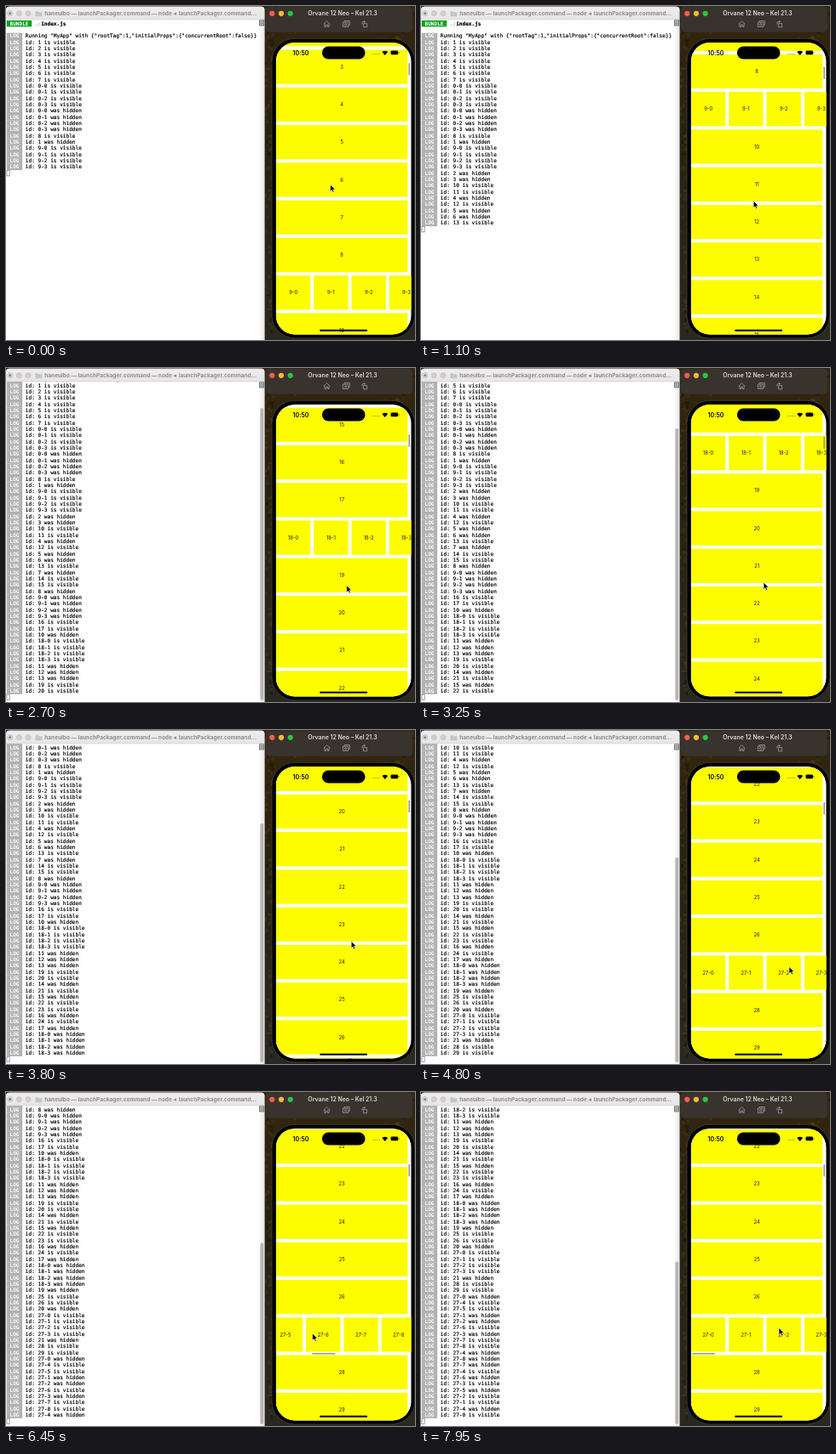
Write an HTML page that moves like this. It is 480x393 px and loops after 8000 ms.

```html
<!DOCTYPE html>
<html lang="en">
<head>
<meta charset="utf-8">
<title>Visibility log</title>
<style>
  html, body { margin: 0; width: 100%; height: 100%; overflow: hidden; background: #1b1712; }
  svg { display: block; width: 100vw; height: 100vh; }
  .ui { font-family: Inter, Roboto, sans-serif; }
  .mono { font: 6.1px "DejaVu Sans Mono", "Liberation Mono", monospace; fill: #000; }
  .mono text { stroke: #000; stroke-width: .16px; }
  .bold { font-weight: 700; }
  .mono .tag { font-weight: 700; fill: #fff; stroke: none; }
  .mono .dim { fill: #999; stroke: none; }
  .cell { font-size: 5.8px; text-anchor: middle; fill: #1c1c00; }
</style>
</head>
<body>
<svg viewBox="0 0 480 393" xmlns="http://www.w3.org/2000/svg">
  <defs>
    <clipPath id="screen"><rect x="316.9" y="43" width="158.6" height="343.4" rx="22"/></clipPath>
    <clipPath id="page"><rect y="16" width="297" height="377"/></clipPath>
    <linearGradient id="bar" x2="0" y2="1">
      <stop offset="0" stop-color="#efedee"/><stop offset="1" stop-color="#e6e4e5"/>
    </linearGradient>
    <linearGradient id="track">
      <stop offset="0" stop-color="#fdfdfd"/><stop offset="1" stop-color="#e9e9e9"/>
    </linearGradient>
    <linearGradient id="wall" x2="0" y2="1">
      <stop offset="0" stop-color="#35260f"/><stop offset=".4" stop-color="#28220f"/><stop offset="1" stop-color="#2a2820"/>
    </linearGradient>
  </defs>

  <rect width="480" height="393" fill="url(#wall)"/>
  <g id="specks"></g>

  <g id="terminal">
    <path d="M0 393V4.8a4 4 0 0 1 4-4H299.4a4 4 0 0 1 4 4V393z" fill="#fefefe"/>
    <g clip-path="url(#page)"><g id="log" class="mono"></g></g>
    <rect x="297" y="16" width="6.4" height="377" fill="url(#track)"/>
    <rect id="thumb" x="298.4" width="3.8" rx="1.9" fill="#b6b6b6"/>
    <rect x="297.6" y="16.6" width="4.8" height="6.4" fill="#c4c4c4" stroke="#5c5c5c" stroke-width=".8"/>
    <path d="M298.5 18.7h3M298.5 20.9h3" stroke="#5c5c5c" stroke-width=".8"/>
    <path d="M0 16V4.8a4 4 0 0 1 4-4H299.4a4 4 0 0 1 4 4V16z" fill="url(#bar)"/>
    <path d="M0 16h303.4" stroke="#d0cecf" stroke-width=".6"/>
    <g fill="#d0cecf" stroke="#bdbbbc" stroke-width=".5">
      <circle cx="4.7" cy="8.7" r="3.1"/><circle cx="15.3" cy="8.7" r="3.1"/><circle cx="26" cy="8.7" r="3.1"/>
    </g>
    <circle cx="4.7" cy="8.7" r="1.1" fill="#666"/>
    <path d="M34.5 6.2h3l.8 1h4v5h-7.8z" fill="#c3c5c7"/>
    <text class="ui" x="45.3" y="11" font-size="6.5" font-weight="700" fill="#8d8b8c">haneulbo — launchPackager.command — node ◂&#160; launchPackager.command…</text>
    <path d="M303.4 5V393" stroke="#8b8883" stroke-width=".5"/>
  </g>

  <g id="toolbar">
    <rect x="305" y=".8" width="172" height="30" rx="4.5" fill="#39332e"/>
    <circle cx="312.3" cy="8.8" r="3.1" fill="#fb5d54"/>
    <circle cx="323" cy="8.8" r="3.1" fill="#fcbb2e"/>
    <circle cx="333.7" cy="8.8" r="3.1" fill="#2bc640"/>
    <text class="ui" x="395" y="11.2" font-size="6.9" font-weight="600" text-anchor="middle" fill="#dedbd8">Orvane 12 Neo – Kel 21.3</text>
    <g fill="none" stroke="#aaa5a0" stroke-width=".75" stroke-linejoin="round">
      <path d="M372.8 21.3l3.7-3.5 3.7 3.5M373.9 20.6v3.9h1.7v-2.3h1.8v2.3h1.7v-3.9"/>
      <path d="M397 19v-1.4h6.3v4.8h-1.2M395.4 19.2h6.4v5.2h-6.4z"/>
      <circle cx="398.6" cy="21.8" r="1.2"/>
      <path d="M419.4 20.6h4.2v4.2h-4.2zM418 21.6v-1.8q0-1.4 1.4-1.4h2M420.2 17.2l1.4 1.2-1.4 1.2"/>
    </g>
  </g>

  <rect x="312" y="38.3" width="167.8" height="352.6" rx="27" fill="#000" stroke="#403c37" stroke-width=".9"/>
  <g clip-path="url(#screen)" class="ui">
    <rect x="316" y="42" width="160" height="346" fill="#fff"/>
    <g id="list"></g>
    <rect id="vbar" x="472.5" width="1.4" height="14.5" rx=".7" fill="#888"/>
    <text x="336.6" y="57.5" font-size="7" font-weight="600">10:50</text>
    <rect x="370.9" y="47.6" width="50.6" height="14.8" rx="7.4"/>
    <g fill="#77770a">
      <circle cx="431" cy="56.5" r=".6"/><circle cx="433.3" cy="56.5" r=".6"/>
      <circle cx="435.6" cy="56.5" r=".6"/><circle cx="437.9" cy="56.5" r=".6"/>
    </g>
    <path d="M441.3 54a4.9 4.9 0 0 1 6.8 0l-3.4 4z"/>
    <rect x="451.5" y="52.4" width="8.6" height="4.9" rx="1.4"/>
    <rect x="460.6" y="54" width=".8" height="1.7" rx=".4"/>
    <rect x="368.1" y="380.7" width="56" height="2" rx="1"/>
  </g>
  <path id="cursor" d="M0 0V8.2L1.9 6.5 3.1 9.3 4.6 8.7 3.4 5.9H5.9z" fill="#000" stroke="#fff" stroke-width=".6"/>
</svg>

<script>
const LOOP = 8000, STEP = 50;
const PITCH = 44.27, CELL = 40.3, LEFT = 317;
const CHAR = 3.67, LINE = 7.335, TOP = 17, ROWS = 51;
const $ = id => document.getElementById(id);

// Log: number, optional "-n" or "+" for four cards at once, then v(isible) or h(idden)
const BEFORE = '1v 2v 3v 4v 5v 6v 7v 0+v 0+h 8v 1h 9+v'.split(' ');
const DURING = (
  '2h 3h 10v 11v 4h 12v 5h 6h 13v ' +
  '7h 14v 15v 8h 9+h 16v 17v 10h 18+v 11h 12h 13h 19v 20v ' +
  '14h 21v 15h 22v 23v 16h 24v 17h 18+h ' +
  '19h 25v 26v 20h 27+v 21h 28v 29v ' +
  '27-0h 27-4v 27-5v 27-1h 27-2h 27-6v 27-3h 27-7v 27-8v 27-4h ' +
  '27-8h 27-7h 27-4v 27-6h 27-3v 27-5h 27-2v 27-1v 27-4h 27-0v').split(' ');

// Tracks: [time, value]
const EVENTS = [[0, 0], [1100, 9], [2700, 23], [3800, 32], [4750, 40], [5150, 40], [6400, 50], [6600, 50], [7640, 60]];
const SCROLL = [[0, 61.2], [1100, 277.2], [2700, 597.3], [3800, 789.5], [4600, 909.8], [LOOP, 909.8]];
const SWIPE = [[0, 0], [4950, 0], [5650, 105], [6380, 230.5], [6520, 230.5], [7450, 0], [LOOP, 0]];
const MOUSE_X = [[0, 380.5], [1100, 390.2], [2700, 399.7], [3800, 405.2], [4800, 432], [6450, 359.6], [7950, 420]];
const MOUSE_Y = [[0, 210], [1100, 229.3], [2700, 255.8], [3800, 248.6], [4800, 278.5], [6450, 284], [7950, 277.5]];

function linear(pts, t) {
  const i = pts.findIndex(p => p[0] > t);
  if (i < 0) return pts[pts.length - 1][1];
  const [a, b] = [pts[i - 1], pts[i]];
  return a[1] + (b[1] - a[1]) * (t - a[0]) / (b[0] - a[0]);
}

// Monotone cubic through the points
function smooth(pts, t) {
  const i = pts.findIndex(p => p[0] > t) - 1;
  if (i < 0) return pts[pts.length - 1][1];
  const rate = k => (pts[k + 1][1] - pts[k][1]) / (pts[k + 1][0] - pts[k][0]);
  const slope = k => {
    if (k === 0) return rate(0);
    if (k === pts.length - 1) return rate(k - 1);
    const a = rate(k - 1), b = rate(k);
    return a * b > 0 ? 2 * a * b / (a + b) : 0;
  };
  const h = pts[i + 1][0] - pts[i][0], u = (t - pts[i][0]) / h, v = 1 - u;
  return v * v * (1 + 2 * u) * pts[i][1] + u * u * (3 - 2 * u) * pts[i + 1][1]
    + h * u * v * (v * slope(i) - u * slope(i + 1));
}

function expand(event) {
  const verb = event.endsWith('v') ? 'is visible' : 'was hidden';
  const id = event.slice(0, -1);
  const ids = id.endsWith('+') ? [0, 1, 2, 3].map(n => id.replace('+', '-' + n)) : [id];
  return ids.map(n => `id: ${n} ${verb}`);
}

const col = n => 0.8 + n * CHAR;
const text = (c, y, s, cls = '') => `<text x="${col(c)}" y="${y}" class="${cls}">${s}</text>`;

function buildLog() {
  const lines = ['Running "MyApp" with {"rootTag":1,"initialProps":{"concurrentRoot":false}}', ...BEFORE.flatMap(expand)];
  const totals = [lines.length];
  for (const e of DURING) {
    lines.push(...expand(e));
    totals.push(lines.length);
  }
  const base = TOP + 5.6;
  $('log').innerHTML =
    `<rect x=".8" y="${TOP}" width="${8 * CHAR}" height="${LINE}" fill="#07a31d"/>` +
    text(1, base, 'BUNDLE', 'tag') + text(9, base, './', 'dim') + text(11, base, 'index.js', 'bold') +
    lines.map((s, i) => {
      const y = (i + 2) * LINE;
      return `<g class="line"><rect x=".8" y="${TOP + y}" width="${5 * CHAR}" height="${LINE + 0.1}" fill="#b1b1b1"/>` +
        text(1, base + y, 'LOG', 'tag') + text(6, base + y, s) + '</g>';
    }).join('') +
    `<rect id="prompt" x="1" width="3.2" height="6.3" fill="none" stroke="#8a8a8a" stroke-width=".8"/>`;
  return totals;
}

function cell(x, y, w, label) {
  return `<rect x="${x}" y="${y - CELL / 2}" width="${w}" height="${CELL}" fill="#fdfd00"/>` +
    `<text class="cell" x="${x + w / 2}" y="${y + 2.1}">${label}</text>`;
}

function buildList() {
  let out = '';
  for (let n = 1; n <= 30; n++) {
    const y = n * PITCH;
    if (n % 9) { out += cell(LEFT, y, 154.3, n); continue; }
    let cards = '';
    for (let k = 0; k < (n === 27 ? 12 : 4); k++) cards += cell(LEFT + k * PITCH, y, CELL, `${n}-${k}`);
    out += `<g id="row${n}">${cards}</g>`;
  }
  out += `<rect id="hbar" y="${27 * PITCH + 21.7}" width="27.5" height="1.3" rx=".65" fill="#808080"/>`;
  $('list').innerHTML = out;
}

function buildWall() {
  let seed = 7, out = '';
  const rnd = () => (seed = seed * 16807 % 2147483647) / 2147483647;
  const tones = ['#5a3f14', '#3a3a16', '#15110a', '#4a3412'];
  for (let i = 0; i < 150; i++) {
    const top = i < 50;
    const x = top ? 304 + rnd() * 176 : 303 + rnd() * 11;
    const y = top ? rnd() * 44 : rnd() * 393;
    out += `<ellipse cx="${x.toFixed(1)}" cy="${y.toFixed(1)}" rx="${(1 + rnd() * 2).toFixed(1)}" ry="${(0.8 + rnd() * 2).toFixed(1)}" fill="${tones[i % 4]}" opacity=".5"/>`;
  }
  $('specks').innerHTML = out;
}

buildWall();
buildList();
const totals = buildLog();
const lineNodes = [...document.querySelectorAll('.line')];
const set = (id, attrs) => { for (const k in attrs) $(id).setAttribute(k, attrs[k]); };
let shown = -1;

function drawLog(count) {
  if (count === shown) return;
  shown = count;
  lineNodes.forEach((n, i) => { n.style.display = i < count ? '' : 'none'; });
  const all = count + 3, over = Math.max(0, all - ROWS);
  set('prompt', { y: TOP + (count + 2) * LINE + 0.5 });
  set('log', { transform: `translate(0 ${-over * LINE})` });
  const y = 27 + 364 * over / all;
  set('thumb', { y, height: 391 - y, visibility: over ? 'visible' : 'hidden' });
}

function draw(t) {
  drawLog(totals[Math.floor(linear(EVENTS, t) + 1e-6)]);
  const scroll = smooth(SCROLL, t), swipe = smooth(SWIPE, t);
  set('list', { transform: `translate(0 ${-scroll})` });
  set('row27', { transform: `translate(${-swipe} 0)` });
  set('hbar', { x: 318 + swipe * 0.178, visibility: t > 4950 ? 'visible' : 'hidden' });
  set('vbar', { y: 65.7 + scroll * 0.0212 });
  set('cursor', { transform: `translate(${smooth(MOUSE_X, t)} ${smooth(MOUSE_Y, t)})` });
}

const start = performance.now();
function tick() {
  const t = (performance.now() - start) % LOOP;
  draw(Math.floor(t / STEP) * STEP);
  requestAnimationFrame(tick);
}
tick();
</script>
</body>
</html>
```
